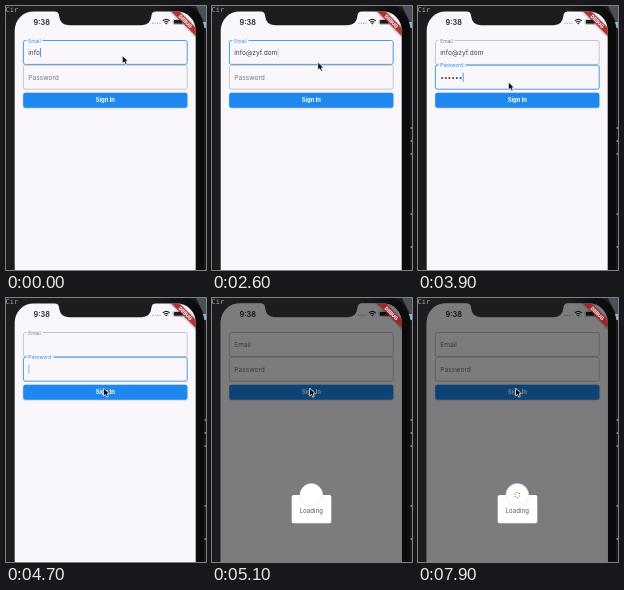
An HTML page that plays this animation: 200 px wide and 264 px high, repeating every 8000 ms.

```html
<!DOCTYPE html>
<html lang="en">
<head>
<meta charset="utf-8">
<title>Sign in</title>
<style>
  html, body { margin: 0; width: 100%; height: 100%; overflow: hidden; background: #1d1b1e; }
  svg { display: block; width: 200px; height: 264px; font-family: Inter, Roboto, sans-serif; }
  .mono { font: 7px "DejaVu Sans Mono", monospace; fill: #a9a9ab; }
  .value { font-size: 6.6px; fill: #434346; }
  .frame { fill: none; }
</style>
</head>
<body>
<svg viewBox="0 0 200 264">
  <defs>
    <clipPath id="screen"><rect x="8.7" y="5.4" width="181" height="300" rx="19"/></clipPath>
    <filter id="soft" x="-20%" y="-60%" width="140%" height="220%"><feGaussianBlur stdDeviation="1"/></filter>
    <linearGradient id="bezel" gradientUnits="userSpaceOnUse" x1="0" x2="200" y1="0" y2="0">
      <stop offset=".75" stop-color="#1e1c1f"/><stop offset=".95" stop-color="#0b0b0c"/>
    </linearGradient>
  </defs>

  <rect width="200" height="264" fill="#1d1b1e"/>
  <path d="M190 0H200V24L197 14Z" fill="#4a5058"/>
  <path d="M196.5 16H200V22H198.500Z" fill="#8fb4cc"/>
  <rect x="1" y="-3" width="197.2" height="320" rx="27" fill="url(#bezel)"/>
  <text class="mono" x="-.5" y="5.6">Cir</text>
  <g id="marks" fill="#77777a">
    <rect x="198.5" y="121" width="1.5" height="2"/>
    <rect x="198.5" y="134" width="1.5" height="2"/>
    <rect x="198.5" y="147" width="1.5" height="2"/>
    <rect x="198.5" y="207" width="1.5" height="2"/>
    <rect x="198.5" y="240" width="1.5" height="2"/>
  </g>

  <g clip-path="url(#screen)">
    <rect x="8" y="5" width="183" height="260" fill="#f9f7fb"/>

    <text x="27.6" y="18.8" font-size="7.3" font-weight="600" fill="#1d1d20">9:38</text>
    <g fill="#a8a8ac">
      <circle cx="146.8" cy="17.2" r=".7"/><circle cx="149.2" cy="17.2" r=".7"/>
      <circle cx="151.6" cy="17.2" r=".7"/><circle cx="154" cy="17.2" r=".7"/>
    </g>
    <g fill="none" stroke="#1d1d20" stroke-width="1.1">
      <path d="M156.8 14.8Q160.3 11.9 163.8 14.8M158.2 16.3Q160.3 14.6 162.4 16.3"/>
    </g>
    <path d="M159.1 17.3Q160.3 16.4 161.5 17.3L160.3 18.6Z" fill="#1d1d20"/>
    <rect x="167" y="13.3" width="10.6" height="5.2" rx="1.4" fill="none" stroke="#8a8a8e" stroke-width=".5"/>
    <rect x="167.8" y="14" width="9" height="3.8" rx=".8" fill="#1d1d20"/>
    <rect x="178.3" y="15" width=".7" height="1.8" fill="#8a8a8e"/>

    <g id="form"></g>

    <rect x="17.5" y="87.5" width="163.5" height="14.6" rx="2" fill="#000" opacity=".22" filter="url(#soft)"/>
    <rect x="17.2" y="86.8" width="164.2" height="15" rx="2" fill="#1e88ee"/>
    <text x="99.3" y="96.1" font-size="5.8" font-weight="700" text-anchor="middle" fill="#fff">Sign In</text>
    <rect id="splash" x="17.2" y="86.8" width="164.2" height="15" rx="2" fill="#fff"/>

    <rect id="shade" x="8" y="5" width="183" height="260" fill="#000"/>

    <g id="popup">
      <rect x="79.7" y="197" width="39.6" height="28.3" rx="2" fill="#fff"/>
      <circle cx="99.3" cy="197" r="11.4" fill="#fff" stroke="#dcdcde" stroke-width=".5"/>
      <text x="99.3" y="215.3" font-size="6" text-anchor="middle" fill="#565659" letter-spacing=".15">Loading</text>
      <g id="spinner"></g>
    </g>

    <g transform="translate(189.8 5) rotate(45)">
      <rect x="-20" y="11.9" width="40" height="6.2" fill="#000" opacity=".4" filter="url(#soft)"/>
      <rect x="-20" y="11.9" width="40" height="5.8" fill="#b71c1c" fill-opacity=".8"/>
      <text y="16.5" font-size="4.8" font-weight="800" text-anchor="middle" fill="#fff">DEBUG</text>
    </g>
  </g>

  <path d="M47 4.5Q53 5.400 53 9.500Q54 19.200 63 19.200H135.500Q144.500 19.200 145.500 9.500Q145.500 5.400 151.500 4.500Z" fill="#1e1c1f"/>

  <path id="cursor" d="M0 0V8L1.9 6.4L3.2 9.2L4.7 8.5L3.5 5.8H5.8Z"
        fill="#0b0b0c" stroke="#fff" stroke-width=".7" stroke-linejoin="round"/>
</svg>
<script>
  const LOOP = 8000, STEP = 100;
  const EMAIL = "info@zyf.dom";
  const EMAIL_KEYS = [1100, 1300, 1400, 1600, 1800, 1900, 2000, 2100];
  const BLUE = "#2f93e8", GREY = "#77777a";
  const $ = id => document.getElementById(id);

  const clamp = x => Math.min(1, Math.max(0, x));
  const ramp = (t, start, length) => clamp((t - start) / length);
  const mix = (a, b, k) => a + (b - a) * k;
  const smooth = x => x * x * (3 - 2 * x);

  // cubic-bezier(.4, 0, .2, 1)
  function swift(x) {
    let lo = 0, hi = 1;
    for (let i = 0; i < 20; i++) {
      const s = (lo + hi) / 2;
      if (1.2 * s * (1 - s) ** 2 + .6 * s * s * (1 - s) + s ** 3 < x) lo = s; else hi = s;
    }
    return 3 * lo * lo - 2 * lo ** 3;
  }

  function set(el, attrs) {
    for (const key in attrs) el.setAttribute(key, attrs[key]);
  }
  function add(parent, tag, attrs) {
    const el = document.createElementNS("http://www.w3.org/2000/svg", tag);
    set(el, attrs);
    return parent.appendChild(el);
  }

  function makeField(name, top, height, gap) {
    const form = $("form");
    const frame = add(form, "rect", { class: "frame", x: 17.4, y: top, width: 163.8, height, rx: 2 });
    const notch = add(form, "rect", { x: 20.5, y: top - 1, height: 2, fill: "#f9f7fb" });
    const label = add(form, "text", { x: 22.3 });
    const value = add(form, "text", { class: "value", x: 22.2, y: top + 14.3 });
    const caret = add(form, "rect", { y: top + 7.5, width: .9, height: 9, fill: BLUE });
    label.textContent = name;

    return ({ focus, lift, text, blink }) => {
      set(frame, { stroke: focus ? BLUE : "#a4a4a7", "stroke-width": mix(.6, .9, focus * lift) });
      set(notch, { width: gap * lift });
      set(label, {
        y: top + mix(14.7, 2.2, lift), "font-size": mix(6.6, 4.95, lift),
        fill: focus ? BLUE : GREY
      });
      value.textContent = text;
      const end = text ? value.getComputedTextLength() : 0;
      set(caret, { x: 22.4 + end, opacity: focus ? blink : 0 });
    };
  }

  const email = makeField("Email", 34.5, 23.9, 16);
  const password = makeField("Password", 59.2, 24, 27);

  const dots = ["#e0622f", "#3f6fae", "#59454f", "#c9762c", "#7d4a6b", "#4f5a60"]
    .map(fill => add($("spinner"), "circle", { fill }));

  function drawSpinner(t) {
    const p = (t - 5700 + 1300) % 1300;
    const turn = ramp(p, 300, 800) * Math.PI * 1.5;
    const radius = p < 700 ? mix(2.7, 1.2, smooth(ramp(p, 300, 400))) : mix(1.2, 4, ramp(p, 700, 400));
    const alpha = p < 300 ? .45 + .45 * ramp(p, 0, 100) : 1 - ramp(p, 850, 250);
    dots.forEach((dot, i) => {
      const a = turn + i * Math.PI / 3;
      set(dot, {
        cx: 99.2 + radius * Math.cos(a), cy: 197 + radius * Math.sin(a),
        r: mix(.9, .7, ramp(p, 700, 200)), opacity: t < 5700 ? 0 : alpha
      });
    });
  }

  function draw(t) {
    const cleared = t >= 4600;

    const typed = 4 + EMAIL_KEYS.filter(key => t >= key).length;
    email({
      focus: t < 3000,
      lift: 1 - swift(ramp(t, 4700, 200)),
      text: cleared ? "" : EMAIL.slice(0, typed),
      blink: t < 800 ? 1 - ramp(t, 200, 300) : t < 2400 ? ramp(t, 700, 300) : 1 - ramp(t, 2400, 300)
    });

    const keys = t < 3400 ? 0 : Math.min(8, Math.floor((t - 3400) / 100) + 1);
    password({
      focus: t >= 3000 && t <= 4800,
      lift: swift(ramp(t, 3015, 200)) * (1 - swift(ramp(t, 4750, 200))),
      text: cleared ? "" : "•".repeat(keys),
      blink: t >= 4800 || (t >= 4400 && t < 4600) ? 0 : cleared ? .6 : 1
    });

    const toField = smooth(ramp(t, 2400, 500)), toButton = smooth(ramp(t, 3700, 500));
    const x = mix(mix(116.3, 86.5, toField), 97.6, toButton);
    const y = mix(mix(49.5, 68.3, toField), 90, toButton);
    set($("cursor"), { transform: `translate(${x} ${y})` });

    const shown = 1 - (1 - ramp(t, 4700, 200)) ** 3;
    set($("splash"), { opacity: .25 * ramp(t, 4700, 100) * (1 - ramp(t, 4800, 300)) });
    set($("shade"), { opacity: .5 * shown });
    set($("popup"), { opacity: shown });
    set($("marks"), { opacity: t < 2500 ? 0 : 1 });
    drawSpinner(t);
  }

  let begin, last;
  function tick(now) {
    begin ??= now;
    const t = Math.floor(((now - begin) % LOOP) / STEP) * STEP;
    if (t !== last) draw(last = t);
    requestAnimationFrame(tick);
  }
  draw(0);
  requestAnimationFrame(tick);
</script>
</body>
</html>
```
